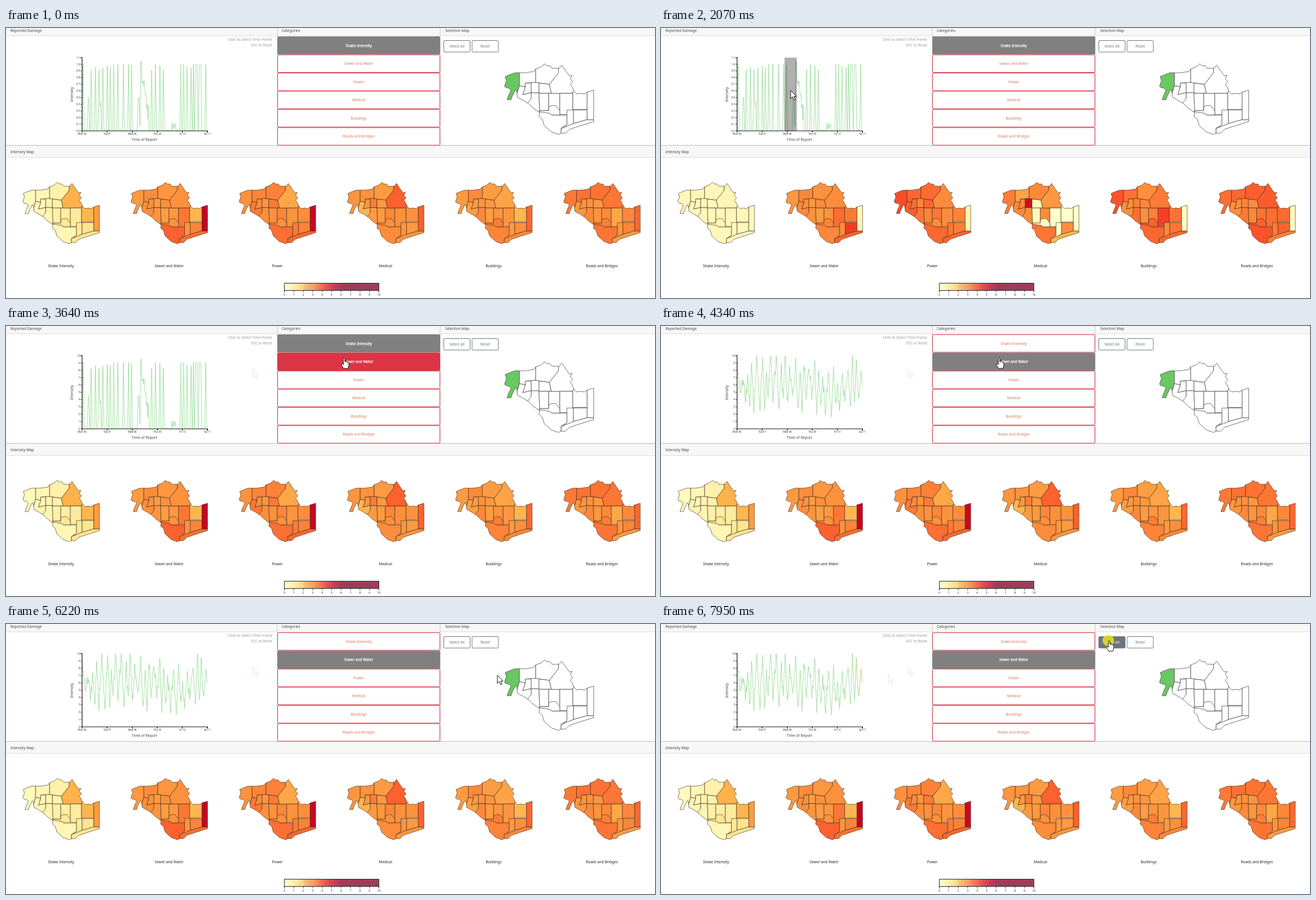
Animation of 1160 by 483 pixels, one loop 8 s. Source, as an HTML page:

```html
<!DOCTYPE html>
<html lang="en">
<head>
<meta charset="utf-8">
<title>Damage dashboard</title>
<style>
html, body { margin: 0; width: 100%; height: 100%; overflow: hidden; background: #fff; }
svg { display: block; width: 1160px; height: 483px; }
text { font: 6.5px "Noto Sans", "Open Sans", sans-serif; fill: #444; }
.mid { text-anchor: middle; }
.end { text-anchor: end; }
.hint { fill: #999; }
.tick { font-size: 4.4px; fill: #333; }
.axis { fill: none; stroke: #111; stroke-width: 1.2; }
.bar { fill: #f7f7f7; stroke: #dcdcdc; }
.rule { stroke: #d4d4d4; fill: none; }
.cat rect { fill: #fff; stroke: #dc3545; }
.cat text { fill: #d8765a; }
.cat.hover rect { fill: #dc3545; }
.cat.active rect { fill: #808080; stroke: #808080; }
.cat.hover text, .cat.active text { fill: #fff; stroke: #fff; stroke-width: .25; }
.btn rect { fill: #fff; stroke: #6c757d; }
.btn text { fill: #6c757d; }
.btn.hover rect { fill: #6c757d; }
.btn.hover text { fill: #fff; }
.line { fill: none; stroke: #8fd98f; stroke-width: .8; }
.shape { fill: #fff; stroke: #3a2616; stroke-width: .75; stroke-linejoin: round; stroke-opacity: .85; vector-effect: non-scaling-stroke; }
.coast { fill: none; }
.pick .shape { stroke: #444; stroke-width: .9; }
.ghost { fill: #fffafa; stroke: #f6dada; stroke-width: .8; }
</style>
</head>
<body>
<svg id="stage" viewBox="0 0 1160 483">
  <defs>
    <clipPath id="land"><path id="landPath"/></clipPath>
    <clipPath id="tail"><rect x="347" y="53" width="14" height="131"/></clipPath>
    <linearGradient id="heat"></linearGradient>
    <path id="arrow" d="M0 0V14.5L3.4 11.4 5.9 17 8.3 16 5.8 10.6H10.2Z"/>
  </defs>
</svg>
<script>
const NS = 'http://www.w3.org/2000/svg';
const LOOP = 8000, STEP = 78;
const stage = document.getElementById('stage');
const clamp = v => Math.max(0, Math.min(1, v));
const lerp = (a, b, p) => a + (b - a) * p;
const noise = i => { const n = Math.sin(i * 12.9898) * 43758.5453; return n - Math.floor(n); };

function add(tag, attrs, parent = stage, label) {
  const node = document.createElementNS(NS, tag);
  for (const key in attrs) node.setAttribute(key, attrs[key]);
  if (label !== undefined) node.textContent = label;
  return parent.appendChild(node);
}
const write = (label, x, y, cls = '', parent = stage) => add('text', { x, y, class: cls }, parent, label);
const show = (node, on) => node.setAttribute('visibility', on ? 'visible' : 'hidden');

// ---------- panels ----------
add('rect', { x: -1, y: -8, width: 1162, height: 22, class: 'bar' });
add('rect', { x: -1, y: 210.5, width: 1162, height: 21, class: 'bar' });
add('path', { d: 'M485 0V210M776 0V210M0 210H1160', class: 'rule', 'stroke-width': 1.3 });
write('Reported Damage', 8, 7);
write('Categories', 493, 7);
write('Selection Map', 785, 7);
write('Intensity Map', 8, 224.3);
write('Click to Select Time Frame', 476, 22.6, 'end hint');
write('ESC to Reset', 476, 33, 'end hint');

const NAMES = ['Shake Intensity', 'Sewer and Water', 'Power', 'Medical', 'Buildings', 'Roads and Bridges'];

function button(x, y, width, height, label, cls) {
  const g = add('g', { class: cls });
  add('rect', { x: x + .5, y: y + .5, width: width - 1, height: height - 1, rx: 1.5 }, g);
  write(label, x + width / 2, y + height / 2 + 2.3, 'mid', g);
  return { g, cls, hit: p => p.x > x && p.x < x + width && p.y > y && p.y < y + height };
}
const cats = NAMES.map((name, i) => button(485, 15 + 32.55 * i, 291, 32.4, name, 'cat'));
const tools = ['Select All', 'Reset'].map((name, i) => button(782 + 50.5 * i, 22, 48, 21.5, name, 'btn'));

// ---------- maps ----------
const COAST = 'M53 290H46L38 293 31 296 33 302 30 311 32 313 37 314 40 317 36 326 34 332H40L42 326 47 316 ' +
  '49 319 50 328 59 333 67 338 74 345 84 352 83 358 88 362 91 372 102 382 113 386 117 384H124L130 378 ' +
  '145 373 167 366V317L157 320 153 323 147 322 141 323 137 319 134 312 131 308 135 304 ' +
  '131 299 134 294 130 295 126 290 118 278 114 283H103L100 279H95L92 276 86 281 78 284 75 288 62 290Z';
// coarse areas from west to east, trimmed by the coast
const AREAS = [
  'M28 280H53V310L44 335H28Z',
  'M53 280H78V305L62 306V312L53 310Z',
  'M62 306H71V321L58 324 62 312Z',
  'M53 310L62 312 58 324 71 321V330L66 345 44 340Z',
  'M71 321H83L84 349 80 356 62 342 71 330Z',
  'M71 305H83V321H71Z',
  'M78 270H113V290L99 308 78 305Z',
  'M83 306L99 308 102 322H83Z',
  'M83 322H98V349H84Z',
  'M98 322H115V349H98Z',
  'M113 270H140V318L133 322H102L99 308 113 290Z',
  'M115 322H135V355H115Z',
  'M135 322L138 312H157V347H135Z',
  'M84 349H98V343L103 341H109L115 349V356H103L99 353H84Z',
  'M78 350L99 353 103 356H126V371L117 376V390H78Z',
  'M126 348H136V369L117 378 126 371Z',
  'M136 348H157V363L136 369Z',
  'M157 363H170V390H117V377L136 369Z',
  'M157 312H170V363H157Z'
];
document.getElementById('landPath').setAttribute('d', COAST);

function drawMap(transform, cls) {
  const g = add('g', { transform, class: cls });
  const inner = add('g', { 'clip-path': 'url(#land)' }, g);
  const areas = AREAS.map(d => add('path', { d, class: 'shape' }, inner));
  add('path', { d: COAST, class: 'shape coast' }, g);
  return areas;
}
drawMap('translate(856.1 -253.1) scale(1.163 1.149)', 'pick')[0].style.fill = '#69c862';
const maps = NAMES.map((name, i) => {
  write(name, 98.3 + 193.35 * i, 428.4, 'mid').style.fill = '#222';
  return drawMap(`translate(${193.35 * i} 0)`, '');
});

const HEAT = ['ffffcc', 'ffeda0', 'fed976', 'feb24c', 'fd8d3c', 'fc4e2a', 'e31a1c', 'bd0026', '800026']
  .map(hex => [0, 2, 4].map(i => parseInt(hex.slice(i, i + 2), 16)));
function heat(level) {
  const i = Math.min(HEAT.length - 2, Math.floor(level));
  return `rgb(${HEAT[i].map((v, c) => Math.round(lerp(v, HEAT[i + 1][c], level - i)))})`;
}

// each category: level in the west, level in the east, areas that stand out
const blank = (...areas) => Object.fromEntries(areas.map(a => [a, 0]));
const spread = cats => cats.map(([west, east, peaks = {}], m) => AREAS.map((_, a) =>
  peaks[a] ?? lerp(west, east, a / 18) * (.9 + .2 * noise(a + 19 * m))));
const SHAKE = [.4, 1.4, { 10: 3, 12: 2.9, 14: .5, 18: 3.6 }];
const AVERAGE = spread([
  SHAKE,
  [3.8, 4.1, { 12: 2.9, 14: 4.7, 18: 6.8 }],
  [3.9, 4.3, { 10: 3.3, 18: 6.7 }],
  [4, 4, { 3: 2.9, 10: 4.7, 18: 4.7 }],
  [3.9, 3.9, { 10: 3.4, 12: 2.9, 18: 4.6 }],
  [4.1, 4, { 11: 3.3, 18: 4.6 }]
]);
const BRUSHED = [
  { x: 177, levels: spread([
    [.4, .1, { 10: 1 }],
    [3.6, 2.3, { 13: 3.8 }],
    [3.5, 2.6],
    [4.2, 4, { 0: 5, 5: 5.4, 6: 5, 13: 1.6, ...blank(9, 10, 11, 12, 15, 18) }],
    [4.7, 4.1, { 12: 5.5, 18: 0 }],
    [4.4, 3.9, { 0: 5, 11: 5.5, 18: .4 }]
  ]) },
  { x: 230, levels: spread([
    [.5, .4],
    [3.9, 4.5, { 16: 5.7, 18: .3 }],
    [4.5, 4.5, { 0: 5.2, 18: .3 }],
    [4.4, 4.4, { 1: 3.3, 5: 6.6, 17: 2.8, ...blank(7, 8, 11, 12, 13, 15, 18) }],
    [4.2, 4.4, { 0: 5, 11: 5.4, 18: .3 }],
    [4.2, 4.7, { 18: .3 }]
  ]) },
  { x: 349, levels: spread([
    SHAKE,
    [4.3, 4.5, { 1: 4.9, 16: 2.9, 18: .3 }],
    [4.7, 4.4, { 7: 5.6, 10: 1.7, 11: 5.9, 16: 5.4, 18: 8 }],
    [4.4, 4.5, { 1: 2.4, 5: 6.6, ...blank(7, 8, 9, 10, 11, 13, 15, 18) }],
    [4.6, 4.3, { 7: 5.5, 18: .2 }],
    [4.2, 4.2, { 6: 3.6, 11: 3.5, 18: 1 }]
  ]) }
];

function paintMaps(x) {
  let from = AVERAGE, to = AVERAGE, p = 0;
  if (x !== null) {
    const i = x < BRUSHED[1].x ? 0 : 1;
    const [a, b] = BRUSHED.slice(i, i + 2);
    from = a.levels;
    to = b.levels;
    p = clamp((x - a.x) / (b.x - a.x));
  }
  maps.forEach((areas, m) => areas.forEach((area, a) => {
    area.style.fill = heat(lerp(from[m][a], to[m][a], p));
  }));
}

// ---------- legend ----------
HEAT.forEach((_, i) => add('stop', { offset: i / 8 * .61, 'stop-color': heat(i) }, document.getElementById('heat')));
add('rect', { x: 497.5, y: 456.5, width: 169, height: 13, fill: 'url(#heat)', opacity: .75 });
for (let x = 533; x < 664; x += 1.69)
  add('path', { d: `M${x} 457V469`, stroke: '#7a1c20', 'stroke-width': .4, opacity: .3 });
add('path', { d: 'M497.5 473V456.5H666.5V473M497.5 469.5H666.5', fill: 'none', stroke: '#222' });
for (let i = 0; i <= 10; i++) {
  const x = 497.5 + 16.9 * i;
  add('path', { d: `M${x} 470V473`, stroke: '#222', 'stroke-width': .8 });
  write(i, x, 479, 'mid tick').style.fontSize = '5.2px';
}

// ---------- chart ----------
const LEFT = 136, RIGHT = 360, TOP = 53, BASE = 184;
const curve = add('path', { class: 'line' });
const tinted = add('path', { class: 'line', 'clip-path': 'url(#tail)', style: 'stroke:#e0cf78;stroke-dasharray:2 1.5' });
add('path', { d: `M${LEFT - 3} ${TOP}H${LEFT}V${BASE}H${RIGHT}V${BASE + 3}`, class: 'axis' });
['Mon 06', 'Tue 07', 'Wed 08', 'Thu 09', 'Fri 10', 'Sat 11'].forEach((day, i) => {
  const x = LEFT + 44.8 * i;
  add('path', { d: `M${x} ${BASE}v3`, class: 'axis', 'stroke-width': .8 });
  write(day, x, 191, 'mid tick');
});
function yAxis(count, format) {
  const g = add('g', {});
  for (let i = 0; i <= count; i++) {
    const y = BASE - (BASE - TOP) * i / count;
    add('path', { d: `M${LEFT - 3} ${y}h3`, stroke: '#222', 'stroke-width': .8 }, g);
    write(format(i), LEFT - 4, y + 1.6, 'end tick', g);
  }
  return g;
}
const unitAxis = yAxis(11, i => (i / 10).toFixed(1));
const tenAxis = yAxis(10, String);
write('Time of Report', 247.5, 201.6, 'mid');
add('text', { class: 'mid', transform: 'translate(119.5 119) rotate(-90)' }, stage, 'Intensity');

// full-height reports at irregular gaps, with three noisy stretches
const within = (x, a, b) => x > a && x < b;
const pulses = [{ c: 147.5, h: .5, flat: .6 }, { c: 237, h: .5, flat: .8 }, { c: 241.5, h: 1.05, flat: .5 }];
for (let c = 138, i = 1; c < RIGHT - 2; c += 4.2 + 6 * noise(i++))
  if (!within(c, 142, 152) && !within(c, 230, 257) && !within(c, 290, 307))
    pulses.push({ c, h: 1, flat: noise(i + 60) > .75 ? 1.4 : .1 });
function shakeAt(x) {
  const n = noise(Math.floor(x));
  let v = 0;
  if (within(x, 164, 171)) v = .1 + .6 * n * (1 - Math.abs(x - 168) / 5);
  if (within(x, 242, 256)) v = lerp(.9, .15, (x - 242) / 14) + .25 * (n - .5);
  if (within(x, 296, 304)) v = .02 + .1 * n;
  for (const { c, h, flat } of pulses) v = Math.max(v, h * clamp(1 - (Math.abs(x - c) - flat) / 1.6));
  return v / 1.1;
}

// zigzag between seeded peaks and dips, roughened a little
function sewerAt(x) {
  const u = (x - 146) / 8.5 + .15 * Math.sin(x / 5);
  const i = Math.floor(u);
  const peak = k => .68 + .36 * noise(k + 7);
  const dip = .14 + .3 * noise(i + 31);
  const p = u - i;
  const v = p < .5 ? lerp(peak(i), dip, p * 2) : lerp(dip, peak(i + 1), p * 2 - 1);
  return clamp(v + .16 * (noise(Math.floor(x / 1.5)) - .5));
}
const samples = [];
for (let x = LEFT; x <= RIGHT; x += .5) samples.push([x, shakeAt(x), sewerAt(x)]);
const curvePath = p => 'M' + samples.map(([x, a, b]) =>
  `${x} ${(BASE - (BASE - TOP) * lerp(a, b, p)).toFixed(1)}`).join('L');

const brush = add('rect', { y: TOP, height: BASE - TOP, opacity: .31 });

// ---------- pointer ----------
const ghosts = [[441, 77, 2940], [406.5, 90, 7170]].map(([x, y, since]) =>
  ({ since, node: add('use', { href: '#arrow', x, y, class: 'ghost' }) }));
const click = add('circle', { cx: 799.5, cy: 29.5, r: 10.3, fill: '#e9e11c', opacity: .85 });
const pointer = add('g', { fill: '#fff', stroke: '#111', 'stroke-linejoin': 'round' });
const arrow = add('use', { href: '#arrow' }, pointer);
const hand = add('path', {
  d: 'M0 1.4Q1.3-.6 2.7 1.4V7.2Q4-.0 5.2 7.4Q6.7 6.2 7.6 8Q9.2 7 9.8 9V13.5L8.2 19H.6L-4 12.2Q-3.6 10 0 12Z'
}, pointer);

const linear = p => p, easeIn = p => p * p, easeOut = p => p * (2 - p);
// start, end, goal x, goal y, easing
const MOVES = [
  [70, 320, 462, 43, easeOut],
  [540, 930, 166, 116, easeOut],
  [1240, 2010, 230, 112, linear],
  [2070, 2860, 441, 77, easeIn],
  [2940, 3330, 603, 57, easeOut],
  [4510, 5060, 859.5, 71, linear],
  [5140, 5300, 908, 95, easeOut],
  [6130, 6490, 640, 64, easeIn],
  [6560, 6850, 366, 102, easeOut],
  [6940, 6940, 350, 102, linear],
  [7090, 7090, 406.5, 90, linear],
  [7170, 7720, 799.5, 29.5, easeOut]
];
function pointerAt(t) {
  let pos = { x: 1100, y: 560 };
  for (const [start, end, x, y, ease] of MOVES) {
    if (t < start) break;
    const steps = Math.round((end - start) / STEP) + 1;
    const p = ease(Math.min(1, Math.floor((t - start) / STEP + 1.3) / steps));
    pos = { x: lerp(pos.x, x, p), y: lerp(pos.y, y, p) };
  }
  return pos;
}
const inChart = p => within(p.x, LEFT, RIGHT) && within(p.y, TOP, BASE);

let lastX, lastMorph;
function draw(t) {
  const pos = pointerAt(t), before = pointerAt(t - STEP);
  const active = t < 3700 ? 0 : 1;
  let over = false;
  const mark = (b, on) => {
    const hit = b.hit(pos);
    over = over || hit;
    b.g.setAttribute('class', b.cls + (on ? ' active' : hit ? ' hover' : ''));
  };
  cats.forEach((b, i) => mark(b, i === active));
  tools.forEach(b => mark(b, false));

  pointer.setAttribute('transform', `translate(${pos.x} ${pos.y})`);
  show(arrow, !over);
  show(hand, over);
  show(click, t >= 7940);
  ghosts.forEach(g => show(g.node, t >= g.since));

  const x0 = Math.max(LEFT, pos.x - 11), x1 = Math.min(RIGHT, pos.x + 11);
  show(brush, inChart(pos));
  brush.setAttribute('x', x0);
  brush.setAttribute('width', Math.max(0, x1 - x0));

  // the maps follow the brush one step late
  const mapX = inChart(before) ? before.x : inChart(pos) ? pos.x : null;
  if (mapX !== lastX) paintMaps(lastX = mapX);

  show(unitAxis, t < 3560);
  show(tenAxis, t >= 3560);
  show(tinted, t >= 6940);
  const p = clamp((t - 3590) / 750);
  const morph = p < .5 ? 4 * p ** 3 : 1 - 4 * (1 - p) ** 3;
  if (morph !== lastMorph) {
    const d = curvePath(lastMorph = morph);
    curve.setAttribute('d', d);
    tinted.setAttribute('d', d);
  }
}
function tick() {
  draw(performance.now() % LOOP);
  requestAnimationFrame(tick);
}
tick();
</script>
</body>
</html>
```
